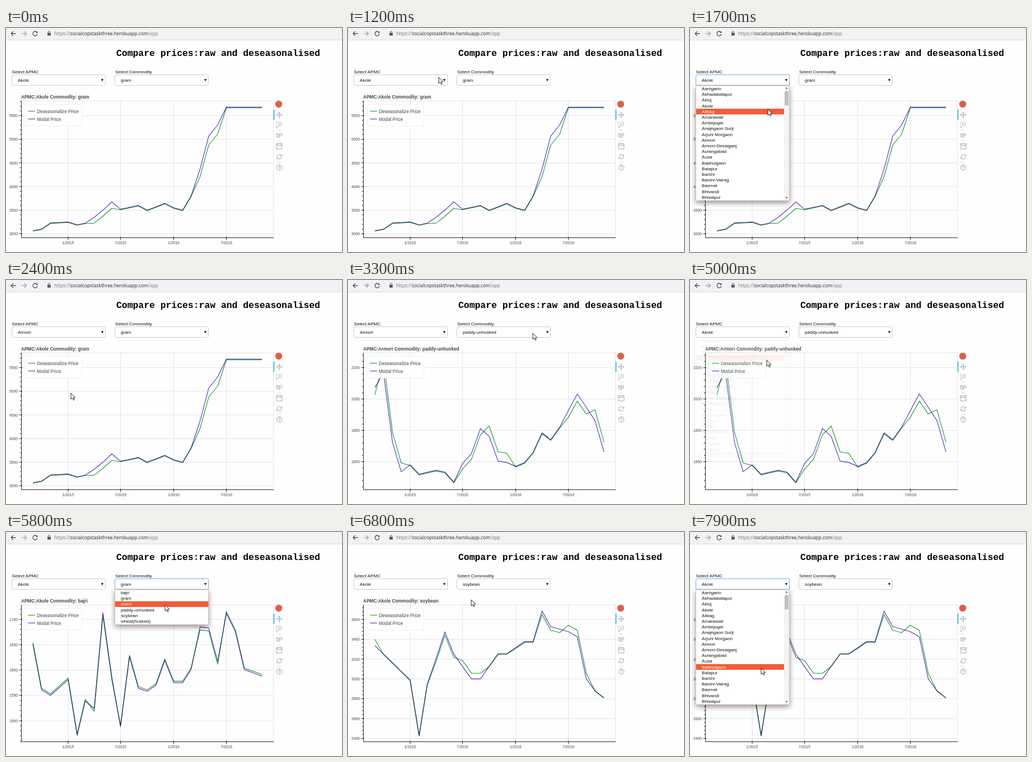
These frames come from a looping animation (600x400 px, 8 s). An HTML page:

```html
<!DOCTYPE html>
<html lang="en">
<head>
<meta charset="utf-8">
<title>Compare prices</title>
<style>
  html, body { margin: 0; width: 600px; height: 400px; overflow: hidden; background: #fefefe; }
  svg { display: block; }
  text { font-family: "Liberation Sans", Arial, sans-serif; font-size: 8.1px; fill: #111; white-space: pre; }
  .url { font-family: "Open Sans", sans-serif; font-size: 8.3px; fill: #777; }
  .head { font: bold 16.4px "Liberation Mono", monospace; fill: #000; }
  .name { font-weight: bold; font-size: 8.2px; fill: #444; }
  .tick { font-size: 6.8px; fill: #444; }
  .key { font-size: 8.2px; fill: #444; }
  .icon { fill: none; stroke: #a1a6a9; }
  .line { fill: none; stroke-width: 1.15; stroke-linejoin: round; mix-blend-mode: multiply; }
  .fit { stroke: #17a12f; }
  .raw { stroke: #5a2fc9; }
</style>
</head>
<body>
<svg id="stage" width="600" height="400" viewBox="0 0 600 400">
  <defs>
    <filter id="shadow" x="-20%" y="-30%" width="140%" height="170%">
      <feDropShadow dx="0" dy="4" stdDeviation="5" flood-opacity=".42"/>
    </filter>
  </defs>
  <rect width="600" height="21" fill="#f1f2f3"/>
  <path d="M0 21.5H600" stroke="#dcdcde"/>
  <g fill="none" stroke="#50555a" stroke-width="1.3">
    <path d="M17.5 10H9M13 6L9 10L13 14"/>
    <path d="M28 10H36.5M32.5 6L36.5 10L32.5 14" stroke="#a5a8ab"/>
    <path d="M55 7.2A4 4 0 1 0 56 11"/>
    <path d="M56.5 5.5V9H53Z" fill="#50555a" stroke="none"/>
    <path d="M75.2 9V7.7a1.7 1.7 0 0 1 3.4 0V9" stroke-width="1"/>
    <rect x="74" y="8.7" width="5.8" height="4.8" rx=".6" fill="#50555a" stroke="none"/>
  </g>
  <text class="url" x="86" y="13.3">https://<tspan fill="#26282b">socialcopstaskthree.herokuapp.com</tspan>/app</text>
  <text class="head" x="197" y="50.4">Compare prices:raw and deseasonalised</text>

  <g id="charts"></g>

  <rect x="34.5" y="136.5" width="101" height="38.5" fill="#fff" fill-opacity=".95" stroke="#f0f0f0"/>
  <path class="line fit" d="M39.5 148.5H52"/>
  <path class="line raw" d="M39.5 162.5H52"/>
  <text class="key" x="55" y="151.5">Deseasonalize Price</text>
  <text class="key" x="55" y="165.5">Modal Price</text>

  <circle cx="487" cy="136" r="6.2" fill="#dd604a"/>
  <path d="M478.5 145.500V164" stroke="#26aae1" stroke-width="1.5"/>
  <path d="M484 182.5H491M484 201.5H491M484 239.5H491" stroke="#ddd"/>
  <g class="icon">
    <path d="M483 155H493M488 150V160M485 153.5L483 155L485 156.5M491 153.5L493 155L491 156.5M486.5 152L488 150L489.5 152M486.5 158L488 160L489.5 158"/>
    <path d="M483 178V168H486M483 178H486" stroke-dasharray="1.5 1"/>
    <circle cx="489.5" cy="171.5" r="2.8"/><path d="M487.5 174L484.5 177"/>
    <rect x="483" y="188.5" width="4" height="6.5" rx="2"/><circle cx="490.5" cy="190.5" r="2.3"/>
    <path d="M489 192.5L487.5 196.5M485 188.5V191"/>
    <path d="M483 206.5H493V216H483ZM485 206.5V210H491V206.5"/>
    <path d="M484 229A4 4 0 0 1 491.5 228M492 231A4 4 0 0 1 484.5 232"/>
    <path d="M492.5 226V229H489.5M483.5 234V231H486.5"/>
    <circle cx="488" cy="249" r="4.8"/>
    <path d="M486.3 248A1.7 1.7 0 1 1 488 249.5V250.5M488 251.3V252.3"/>
  </g>

  <text x="10.5" y="80.6">Select APMC</text>
  <text x="195" y="80.6">Select Commodity</text>
  <g id="menus"></g>
  <path id="cursor" d="M0 0V11L2.6 8.7L4.3 12.6L6.1 11.8L4.4 8H7.8Z" fill="#fff" stroke="#111" stroke-width=".9"/>
</svg>
<script>
const $ = id => document.getElementById(id);
const LOOP = 8000, FADE = 130, ROW = 10.2, TOP = 103, MONTHS = 27;

const markets = ["Aamgaon", "Akhadabalapur", "Akluj", "Akole", "Alibag", "Amarawati", "Ambejogai",
  "Anajngaon Surji", "Arjuni Morgaon", "Armori", "Armori-Desaiganj", "Aurangabad", "Ausa", "Babhulgaon",
  "Balapur", "Barshi", "Barshi-Vairag", "Basmat", "Bhivandi", "Bhiwapur"];
const goods = ["bajri", "gram", "onion", "paddy-unhusked", "soybean", "wheat(husked)"];

// Monthly prices from September 2014; gaps are straight lines, the last price holds.
// The deseasonalised line is the price times one factor per quarter.
const charts = [
  { name: "Akole Commodity: gram", low: 3000, y: 367.5, step: 500, gap: 42.2, quarters: [.997, .963, .997, .997],
    prices: [3065, 3100, 3230, , 3250, 3190, 3225, 3350, 3500, 3675, 3520, , 3600, 3500, , 3645, 3550, 3500, 3800, 4370, 5065, 5305, 5680] },
  { name: "Armori Commodity: paddy-unhusked", low: 1600, y: 324.5, step: 200, gap: 56, quarters: [.997, .997, .978, 1.037],
    prices: [2073, 2166, 1723, 1536, 1580, 1520, , 1545, 1534, 1470, 1588, 1652, 1811, 1763, 1604, 1595, 1570, 1595, 1659, 1784, 1741, 1820, , 2032, , 1862, 1663] },
  { name: "Akole Commodity: bajri", low: 1500, y: 337, step: 50, gap: 45.25, quarters: [1.002, .9965, 1.002, 1.002],
    prices: [1651, 1561, 1550, , 1581, 1471, 1539, 1524, 1713, 1586, 1488, 1626, 1564, 1558, 1570, 1619, 1575, 1575, 1601, 1685, 1683, 1617, 1712, 1676, 1601, , 1588] },
  { name: "Akole Commodity: soybean", low: 2400, y: 368.5, step: 200, gap: 35.4, quarters: [.9975, .99, 1.019, .999],
    prices: [3335, , , , 2990, 2430, 2945, , 3475, 3250, , 3000, 3000, , 3253, 3253, , 3377, 3377, 3685, 3527, , 3476, 3425, 3000, 2880, 2809] }
];

const monthX = m => 111 + (Date.UTC(2014, 8 + m, 1) - Date.UTC(2015, 0, 1)) / 864e5 * 0.5165;

function priceAt(prices, m) {
  let a = Math.min(m, prices.length - 1), b = a;
  while (!(a in prices)) a--;
  while (!(b in prices)) b++;
  return a === b ? prices[a] : prices[a] + (prices[b] - prices[a]) * (m - a) / (b - a);
}

function drawChart({ name, low, y, step, gap, quarters, prices }) {
  const line = (kind, factor) => {
    const points = Array.from({ length: MONTHS }, (_, m) =>
      `${monthX(m).toFixed(1)},${(y - (priceAt(prices, m) * factor(m) - low) / step * gap).toFixed(1)}`);
    return `<polyline class="line ${kind}" points="${points.join(" ")}"/>`;
  };
  let grid = "", ticks = "", labels = "";
  for (let i = -5; i < 40; i++) {
    const ty = y - i * gap / 5;
    if (ty < 131 || ty > 374) continue;
    if (i % 5) { ticks += `M25 ${ty}H27`; continue; }
    grid += `M27 ${ty}H478`;
    ticks += `M23.5 ${ty}H29`;
    labels += `<text class="tick" text-anchor="end" x="21" y="${ty + 2.6}">${low + i / 5 * step}</text>`;
  }
  for (let m = 4; m < MONTHS; m += 6) {
    const x = monthX(m), date = new Date(Date.UTC(2014, 8 + m, 1));
    grid += `M${x} 130V374`;
    ticks += `M${x} 372.5V378.5`;
    labels += `<text class="tick" text-anchor="middle" x="${x}" y="386.4">${date.getUTCMonth() + 1}/${date.getUTCFullYear()}</text>`;
  }
  return `<g><path d="${grid}" stroke="#e4e4ec"/>
    <path d="M27 130H477.5V374" fill="none" stroke="#e4e4e8"/>
    ${line("fit", m => quarters[Math.floor((m + 8) % 12 / 3)])}${line("raw", () => 1)}
    <path d="M27.5 130V374.5H478${ticks}" fill="none" stroke="#111" stroke-width=".9"/>${labels}
    <text class="name" x="27" y="125.6">APMC:${name}</text></g>`;
}

function drawMenu(x, items, scroll) {
  const bar = `<path d="M168 104h9v203h-9Z" fill="#f3f3f3"/><path d="M169 112.5h7v25.5h-7Z" fill="#c1c1c1"/>
    <path d="M170.5 108.5h4l-2 -2.5ZM170.5 302h4l-2 2.5Z" fill="#555"/>`;
  const names = items.map((s, i) => `<text class="item" x="${x + 10.5}" y="${TOP + 8 + i * ROW}">${s}</text>`);
  return `<g><rect class="box" x="${x}" y="83.5" width="167" height="19" rx="2.5" fill="#fff"/>
    <text class="value" x="${x + 10.5}" y="96.3"></text><path d="M${x + 159.3} 91.3h4.4l-2.2 4Z" fill="#111"/>
    <g class="list"><rect x="${x}" y="${TOP}" width="167" height="${items.length * ROW + 1}" fill="#fff" stroke="#e3a791" stroke-width=".7" filter="url(#shadow)"/>
    <rect class="pick" x="${x + .4}" width="${scroll ? 157 : 166.5}" height="${ROW}" fill="#f15c36"/>
    ${names.join("")}${scroll ? bar : ""}</g></g>`;
}

$("charts").innerHTML = charts.map(drawChart).join("");
$("menus").innerHTML = drawMenu(10.5, markets, true) + drawMenu(194.5, goods, false);

// Times in ms: open spans, then [time, index] changes
const [marketMenu, goodsMenu] = $("menus").children;
const menus = [
  { el: marketMenu, items: markets, open: [[1300, 2250], [4000, 4880], [7500, LOOP]], values: [[0, 3], [2250, 9], [4880, 3]] },
  { el: goodsMenu, items: goods, open: [[5500, 6500]], values: [[0, 1], [2600, 3], [5200, 1], [6500, 4]] }
];
const chartTimes = [[0, 0], [2600, 1], [5200, 2], [6700, 3]];

// Pointer stops: arrive, leave, x, y
const stops = [
  [600, 600, 300, 330], [1100, 1300, 162, 88], [2100, 2700, 116, 202], [3200, 3500, 330, 95],
  [3900, 4100, 165, 93], [4700, 5000, 137, 143], [5400, 5500, 330, 95], [5800, 5800, 284, 130],
  [6200, 6500, 275, 149], [7100, 7500, 165, 93], [7900, LOOP, 127, 243]
];

const latest = (list, t) => list.filter(e => e[0] <= t).pop()[1];

function cursorAt(t) {
  const i = Math.max(1, stops.findIndex(s => t < s[1]));
  const [, leave, x0, y0] = stops[i - 1], [arrive, , x1, y1] = stops[i];
  const u = Math.min(1, Math.max(0, (t - leave) / (arrive - leave))), k = u * u * (3 - 2 * u);
  return [x0 + (x1 - x0) * k, y0 + (y1 - y0) * k];
}

function updateMenu({ el, items, open, values }, t, cursorY) {
  const q = s => el.querySelector(s);
  const value = latest(values, t);
  const span = open.find(([a, b]) => t >= a && t < b + FADE);
  const active = span && t < span[1];
  const hover = active && cursorY > TOP ? Math.min(items.length - 1, Math.floor((cursorY - TOP) / ROW)) : value;
  q(".value").textContent = items[value];
  q(".box").setAttribute("stroke", active ? "#66afe9" : "#ccc");
  q(".list").setAttribute("opacity", active ? 1 : span ? 1 - (t - span[1]) / FADE : 0);
  q(".pick").setAttribute("y", TOP + .3 + hover * ROW);
  el.querySelectorAll(".item").forEach((e, i) => e.style.fill = i === hover ? "#fff" : "");
}

function draw(now) {
  const t = Math.floor(now % LOOP / 100) * 100;
  const [x, y] = cursorAt(t), shown = latest(chartTimes, t);
  [...$("charts").children].forEach((g, i) => g.style.display = i === shown ? "" : "none");
  menus.forEach(m => updateMenu(m, t, y));
  $("cursor").setAttribute("transform", `translate(${x} ${y})`);
  $("cursor").style.display = t < stops[0][0] ? "none" : "";
}

const start = performance.now();
function tick() {
  draw(performance.now() - start);
  requestAnimationFrame(tick);
}
tick();
</script>
</body>
</html>
```
